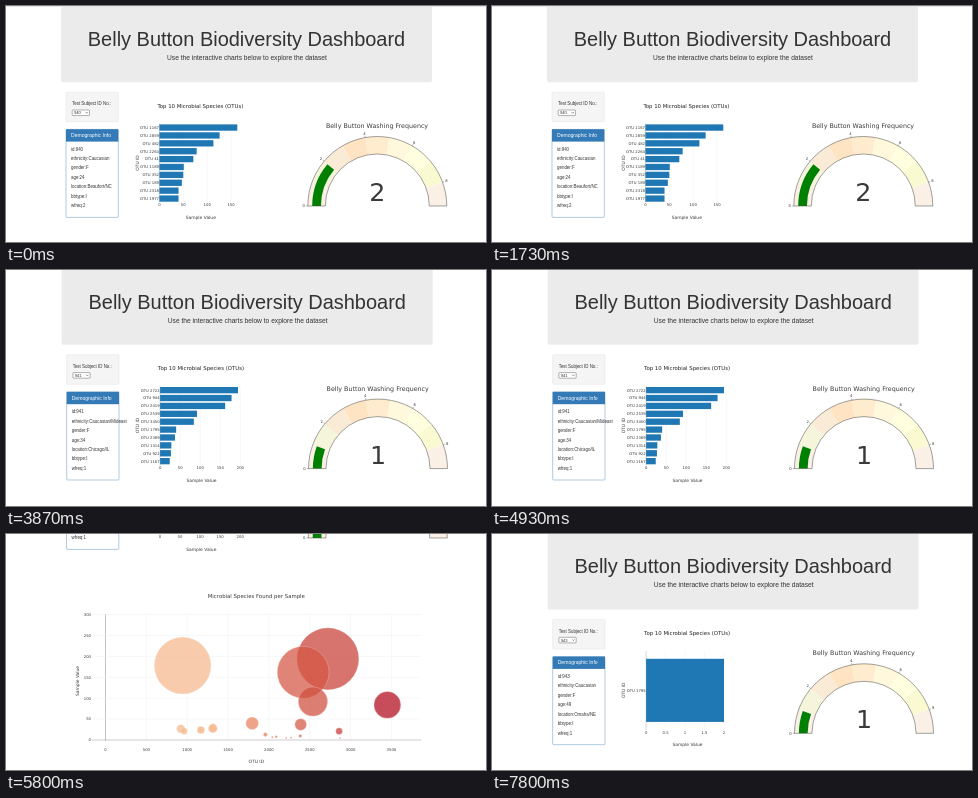
Write an HTML page that moves like this. It is 480x236 px and loops after 8 s.

```html
<!DOCTYPE html>
<html lang="en">
<head>
<meta charset="utf-8">
<title>Biodiversity dashboard</title>
<style>
html, body { margin: 0; width: 100%; height: 100%; overflow: hidden; background: #fff; }
svg { display: block; width: 480px; height: 236px; }
.sans { font-family: "Liberation Sans", Arial, sans-serif; }
.plot { font-family: "DejaVu Sans", Verdana, sans-serif; }
</style>
</head>
<body>
<svg id="stage" viewBox="0 0 480 236"></svg>
<script>
const NS = "http://www.w3.org/2000/svg";
const stage = document.getElementById("stage");
const LOOP = 8000;
const INK = "#3a3a3a";

// type sizes of the page, scaled to the stage
const px = size => size * 0.317;
const TICK = px(12), AXIS = px(14), TITLE = px(17);

function add(parent, tag, attrs, content) {
  const el = document.createElementNS(NS, tag);
  for (const key in attrs) el.setAttribute(key, attrs[key]);
  if (content !== undefined) el.textContent = content;
  parent.appendChild(el);
  return el;
}
const group = (parent, x = 0, y = 0) => add(parent, "g", { transform: `translate(${x} ${y})` });
const rect = (g, x, y, width, height, fill, more) =>
  add(g, "rect", { x, y, width, height, fill, ...more });
const line = (g, x1, y1, x2, y2, stroke, w = 0.5) =>
  add(g, "line", { x1, y1, x2, y2, stroke, "stroke-width": w });

// y is the middle of the capitals
const text = (g, content, x, y, size, anchor, fill, cls) =>
  add(g, "text", { x, y: y + size * 0.36, "font-size": size, "text-anchor": anchor, fill, class: cls }, content);
const label = (g, content, x, y, size, anchor = "middle", fill = INK) =>
  text(g, content, x, y, size, anchor, fill, "plot");
const prose = (g, content, x, y, size, anchor = "start", fill = "#333") =>
  text(g, content, x, y, size, anchor, fill, "sans");
function upright(g, content, x, y) {
  const turned = add(g, "g", { transform: `translate(${x} ${y}) rotate(-90)` });
  label(turned, content, 0, 0, AXIS);
}

function seeded(seed) {
  return () => {
    seed = (seed * 16807) % 2147483647;
    return seed / 2147483647;
  };
}

const subjects = [
  {
    shift: [0, 0], topLine: true, step: 50,
    info: { id: 940, ethnicity: "Caucasian", gender: "F", age: 24, location: "Beaufort/NC", bbtype: "I", wfreq: 2 },
    bars: [[1167, 163], [2859, 126], [482, 113], [2264, 78], [41, 71], [1189, 51], [352, 50], [189, 47], [2318, 40], [1977, 40]],
    next: [[3450, 37], [874, 36]],
    rest: { count: 22, from: 1750, to: 2950, top: 30 },
    chart: { x0: 112.3, kx: 0.0812, y0: 207.5, ky: 0.54, yMax: 200 }
  },
  {
    shift: [0.7, -1.4], step: 50,
    info: { id: 941, ethnicity: "Caucasian/Mideast", gender: "F", age: 34, location: "Chicago/IL", bbtype: "I", wfreq: 1 },
    bars: [[2722, 194], [944, 178], [2419, 162], [2539, 92], [3450, 84], [1795, 40], [2389, 37], [1314, 28], [922, 27], [1167, 24]],
    next: [[963, 21], [2859, 21]],
    rest: { count: 7, from: 1900, to: 3000, top: 13 },
    chart: { x0: 99.5, kx: 0.0817, y0: 206, ky: 0.418, yMax: 300 }
  },
  {
    shift: [0.7, -0.7], step: 0.5,
    info: { id: 943, ethnicity: "Caucasian", gender: "F", age: 49, location: "Omaha/NE", bbtype: "I", wfreq: 1 },
    bars: [[1795, 2]]
  }
];

function drawHeader(g) {
  rect(g, 55, -4, 371, 80.2, "#ebebeb", { rx: 2 });
  prose(g, "Belly Button Biodiversity Dashboard", 240.5, 32.8, px(63), "middle");
  prose(g, "Use the interactive charts below to explore the dataset", 241, 51.8, px(21), "middle");
}

function drawPanel(g, { info }) {
  rect(g, 60, 86.2, 52.3, 29.5, "#f5f5f5", { stroke: "#e3e3e3", "stroke-width": 0.5, rx: 1 });
  prose(g, "Test Subject ID No.:", 66, 97.9, AXIS);
  rect(g, 66.2, 104, 17.3, 5.6, "#fff", { stroke: "#666", "stroke-width": 0.5, rx: 0.6 });
  prose(g, info.id, 68, 106.8, px(13));
  add(g, "path", { d: "M79.6 106.1l1.1 1.2l1.1 -1.2", fill: "none", stroke: "#333", "stroke-width": 0.5 });

  rect(g, 60, 123.4, 52.3, 88, "#fff", { stroke: "#337ab7", "stroke-width": 0.4, rx: 1 });
  rect(g, 60, 123.2, 52.3, 12.4, "#337ab7");
  prose(g, "Demographic Info", 65, 129.3, px(16), "start", "#fff");
  Object.entries(info).forEach(([key, value], i) =>
    prose(g, `${key}:${value}`, 65, 143 + i * 9.45, AXIS));
}

function drawBars(g, { bars, step }) {
  const left = 153.4, top = 117.6, height = 78.9, width = 82;
  const max = bars[0][1] / 0.95, k = width / max;
  const row = height / bars.length;
  label(g, "Top 10 Microbial Species (OTUs)", 194.4, 99.7, TITLE, "middle", "#222");
  for (let v = 0; v <= max; v += step) {
    const x = left + v * k;
    line(g, x, top, x, top + height, v ? "#eee" : "#999", 0.4);
    label(g, v, x, 199, TICK);
  }
  bars.forEach(([otu, value], i) => {
    const y = top + row * (i + 0.5);
    rect(g, left, y - row * 0.4, value * k, row * 0.8, "#1f77b4");
    label(g, "OTU " + otu, left - 0.4, y, TICK, "end");
  });
  upright(g, "OTU ID", 131, 157);
  label(g, "Sample Value", 194.8, 211.6, AXIS);
}

function drawGauge(g, { info }) {
  const cx = 371.3, cy = 200, inner = 52, outer = 69.5;
  const mid = (inner + outer) / 2, half = (outer - inner) / 4;
  const tints = ["linen", "beige", "antiquewhite", "bisque", "blanchedalmond",
    "cornsilk", "lightyellow", "lightgoldenrodyellow", "linen"];
  const max = tints.length;
  const at = (v, r) => {
    const a = Math.PI * (1 - v / max);
    return [cx + r * Math.cos(a), cy - r * Math.sin(a)];
  };
  const ring = (from, to, r1, r2) =>
    `M${at(from, r2)}A${r2} ${r2} 0 0 1 ${at(to, r2)}L${at(to, r1)}A${r1} ${r1} 0 0 0 ${at(from, r1)}Z`;

  label(g, "Belly Button Washing Frequency", 371, 119.7, px(20));
  tints.forEach((fill, i) => add(g, "path", { d: ring(i, i + 1, inner, outer), fill }));
  add(g, "path", { d: ring(0, info.wfreq, mid - half, mid + half), fill: "green" });
  add(g, "path", { d: ring(0, max, inner, outer), fill: "none", stroke: "#444", "stroke-width": 0.5 });
  for (let v = 0; v < max; v += 2) {
    line(g, ...at(v, outer), ...at(v, outer + 1.7), "#444", 0.4);
    label(g, v, ...at(v, outer + 4.1), TICK);
  }
  label(g, info.wfreq, cx, 186, px(80));
}

// grey to peach to red
function heat(otu) {
  const t = Math.max(0, Math.min(1, (otu - 41) / 3409));
  const blend = (a, b, f) => `rgb(${a.map((c, i) => Math.round(c + (b[i] - c) * f))})`;
  const grey = [220, 220, 220], peach = [245, 195, 157], orange = [245, 160, 105], red = [178, 10, 28];
  if (t < 0.2) return blend(grey, peach, t / 0.2);
  if (t < 0.4) return blend(peach, orange, (t - 0.2) / 0.2);
  return blend(orange, red, (t - 0.4) / 0.6);
}

// the long tail of rare species, falling off in size
function rareSpecies({ count, from, to, top }) {
  const random = seeded(count * 941);
  return Array.from({ length: count }, (_, i) =>
    [from + (to - from) * random(), 4 + (top - 4) * Math.exp(-3 * i / count)]);
}

function drawBubbles(g, s) {
  const { x0, kx, y0, ky, yMax } = s.chart;
  const left = 85.5, right = 415, top = 80;
  const toX = v => x0 + v * kx, toY = v => y0 - v * ky;
  label(g, "Microbial Species Found per Sample", 250.3, 62.3, TITLE);
  for (let v = 0; v <= 3500; v += 500) {
    line(g, toX(v), top, toX(v), y0 + 1, v ? "#eee" : "#888");
    label(g, v, toX(v), y0 + 9.2, TICK);
  }
  for (let v = 0; v <= yMax; v += 50) {
    line(g, left, toY(v), right, toY(v), v ? "#eee" : "#999");
    label(g, v, left - 0.5, toY(v), TICK, "end");
  }
  [...s.bars, ...s.next, ...rareSpecies(s.rest)].forEach(([otu, value]) =>
    add(g, "circle", {
      cx: toX(otu), cy: toY(value), r: value * 0.16, fill: heat(otu),
      opacity: 0.72, stroke: "#fff", "stroke-width": 0.3
    }));
  upright(g, "Sample Value", 71.3, 147);
  label(g, "OTU ID", 250.3, y0 + 21.3, AXIS);
}

const views = [];
function addView(start, s, scrolled) {
  const root = group(stage);
  const page = scrolled ? group(root, 0.5, -196) : group(root, ...s.shift);
  [drawHeader, drawPanel, drawBars, drawGauge].forEach(draw => draw(page, s));
  if (scrolled) drawBubbles(root, s);
  else if (s.topLine) line(root, 0, 0.5, 480, 0.5, "#e4e4e4", 1);
  views.push({ start, root });
}
addView(0, subjects[0], false);
addView(1930, subjects[0], true);
addView(3870, subjects[1], false);
addView(5800, subjects[1], true);
addView(7730, subjects[2], false);

function render(ms) {
  const t = ms % LOOP;
  const current = views.filter(v => v.start <= t).pop();
  views.forEach(v => v.root.setAttribute("display", v === current ? "inline" : "none"));
}

const begin = performance.now();
function tick() {
  render(performance.now() - begin);
  requestAnimationFrame(tick);
}
render(0);
requestAnimationFrame(tick);
</script>
</body>
</html>
```
